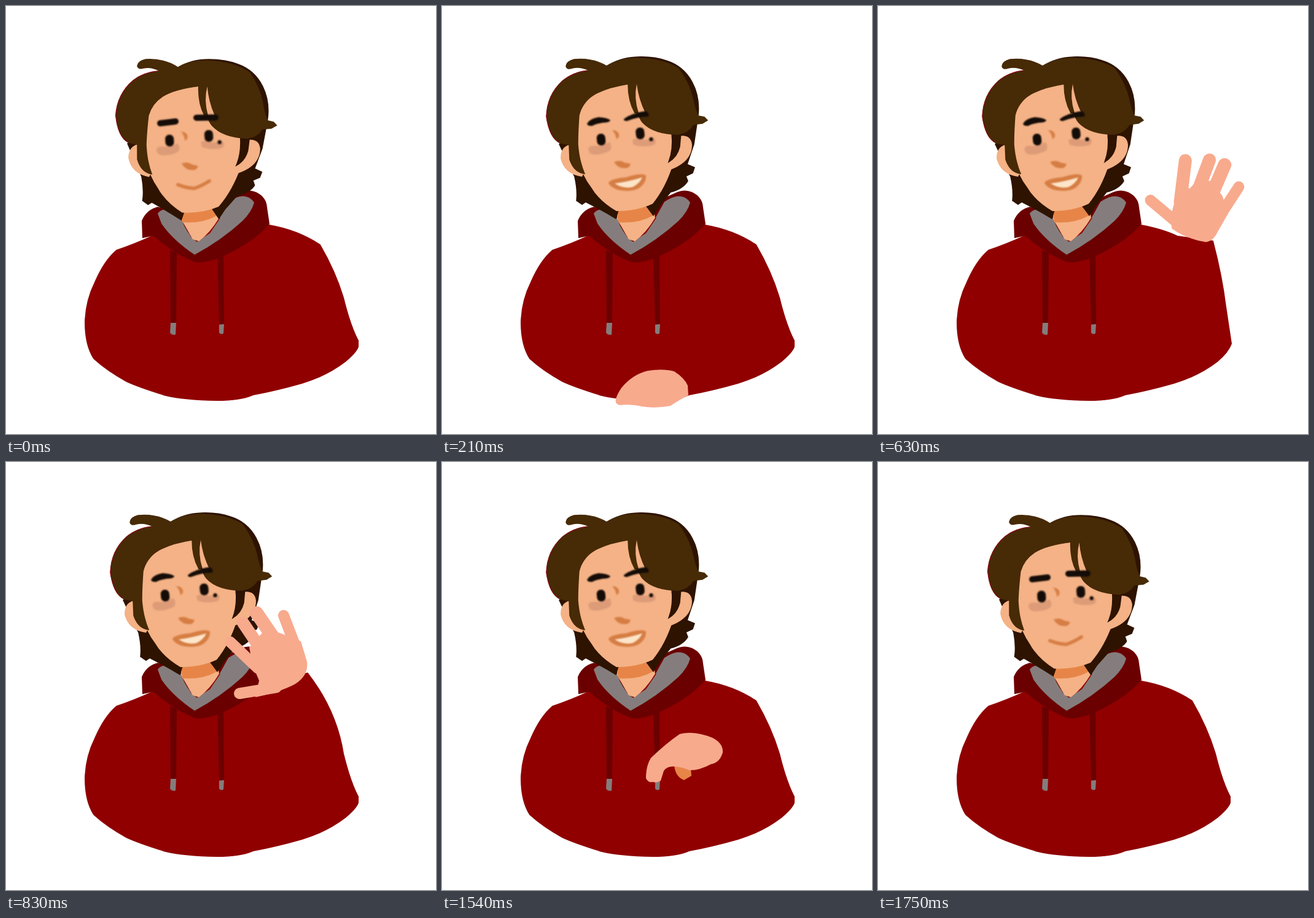
Animation, 700 px wide and 697 px high, one loop 2120 ms. Source, as an HTML page:

```html
<!DOCTYPE html>
<html lang="en">
<head>
<meta charset="utf-8">
<title>Waving</title>
<style>
html, body { margin: 0; width: 100%; height: 100%; overflow: hidden; background: #fff; }
svg { display: block; width: 100%; height: 100%; }
.red { fill: #900000; }
#body { stroke: #900000; stroke-width: 2; }
.hood { fill: #6b0000; }
.grey { fill: #857d7d; }
.skin { fill: #f4b286; }
.hair { fill: #472a06; stroke: #472a06; stroke-width: 1.5; }
.dark { fill: #2e1300; stroke: #2e1300; stroke-width: 1.5; }
.ink { fill: #150c07; }
.blush { fill: #dd9b77; }
.line { fill: #d67d43; }
.shade { fill: #e78548; }
.soft { filter: blur(.8px); }
#hand { fill: #f8aa8d; stroke: #f8aa8d; stroke-width: 0; stroke-linecap: round; }
#calm { fill: none; stroke-linecap: round; stroke-linejoin: round; }
</style>
</head>
<body>
<svg viewBox="0 0 700 697">
  <path id="body"  class="red"/>

  <path class="hood" d="M221 350Q228 332 247 327L300 340L383 303Q395 298 407 303Q424 311 425 328L429 355Q400 388 345 411Q317 421 305 416Q270 402 240 374L222 378Z"/>
  <path class="grey" d="M247 338Q252 331 262 331L285 345L290 358Q300 377 311 384L347 346L362 319Q390 300 404 320Q400 335 385 350Q350 382 307 405Q270 380 253 354Z"/>
  <path class="red" d="M300 375L311 384L332 370L349 345H330Z"/>
  <path class="skin" d="M285 328H344L347 345Q332 370 314 383L304 380L285 347Z"/>
  <path class="shade" d="M284 330L344 324L344 341Q320 355 287 352Z"/>
  <path class="hood" d="M267 398L278 402L277 516H268ZM344 400H354L355 518H347Z"/>
  <path class="grey" d="M268 516H277L276 535Q271 537 267 532ZM347 519L355 518L354 533Q350 536 347 532Z"/>

  <g id="head">
    <path class="dark" d="M268 98Q290 84 318 83Q345 82 365 89C404 101 421 140 417 178L410 225L399 258L411 263L408 272L397 277L400 285Q392 298 372 303L354 325L344 341L330 322L290 322L283 346Q258 331 234 319L228 323L219 317Q221 300 216 278L191 225L300 150Z"/>
    <path class="skin" d="M212 225Q193 227 193 248Q199 274 228 278L236 262ZM380 213Q405 206 407 226Q407 255 368 268Z"/>
    <path class="skin" d="M219 175Q232 135 303 125L335 160L386 205Q388 235 376 258Q364 296 343 322Q318 334 284 334Q256 318 242 294Q227 275 219 240Z"/>
    <path class="dark" d="M374 207Q377 234 369 254Q383 246 387 229L389 206Z"/>
    <path class="hair" d="M202 98Q203 90 215 87Q245 84 268 98Q290 85 318 85Q360 86 385 102Q402 125 408 150Q412 170 417 179L427 181L432 186L424 191L409 193Q402 206 385 209Q345 209 327 190Q320 182 321 175L314 174Q303 155 303 127Q265 133 245 146Q228 158 223 178Q221 205 221 225Q223 252 232 273Q215 271 208 250L207 226L192 223Q175 215 170 180Q171 145 196 122Q215 107 240 105Q225 98 212 101Q203 104 202 98Z"/>
    <path d="M192 223Q175 215 170 180Q171 145 196 122Q212 108 236 105" fill="none" stroke="#9c0018" stroke-width="1"/>
    <path class="skin" d="M317 127Q312 150 320 174L331 174Q320 152 317 127Z"/>
    <g class="soft">
      <path class="blush" d="M238 233Q240 226 253 228L273 222Q279 232 271 237Q252 245 241 240ZM310 219Q318 212 329 218L346 216Q351 223 343 227Q326 231 312 226Z"/>
      <rect class="ink" x="252" y="208" width="14" height="19" rx="6.5" transform="rotate(-6 259 217)"/>
      <rect class="ink" x="315.5" y="198" width="14" height="19" rx="6.5" transform="rotate(-6 322 207)"/>
      <circle class="ink" cx="340.5" cy="217" r="3.2"/>
      <path class="line" d="M277 202Q289 203 288 213L284 217Q283 208 277 202Z"/>
      <path class="line" d="M280 254Q291 250 297 255L307 257Q305 265 297 264Q286 264 280 254Z"/>
    </g>
    <g id="smile" class="soft">
      <path class="ink" d="M236 192Q239 184 255 181Q270 182 274 186Q273 190 262 190Q250 192 245 195Q238 196 236 192ZM296 184Q307 175 331 171Q338 174 336 180Q316 181 302 187Q296 188 296 184Z"/>
      <path class="line" d="M271 288Q275 281 300 279Q325 271 332 276Q333 288 320 297Q305 304 285 299Q273 294 271 288Z"/>
      <path fill="#fde5c9" d="M281 289Q304 286 326 279Q322 289 310 295Q295 298 281 289Z"/>
    </g>
  </g>
  <g id="calm" class="soft">
    <path d="M251 191L276 188M310 182L341 181.5" stroke="#150c07" stroke-width="10"/>
    <path d="M280 291Q292 296 306 297Q317 294 331 285" stroke="#d67d43" stroke-width="5.5"/>
  </g>

  <g id="hand"></g>
</svg>
<script>
const $ = id => document.getElementById(id);

const cuff = "Q560 520 573 545V555";
const arms = {
  rest: "Q475 365 511 389Q536 432 549 475" + cuff,
  up: "L465 368L503 373Q536 425 549 475" + cuff,
  inward: "L440 359L491 344Q538 405 549 475" + cuff,
  half: "Q465 364 487 375L545 383Q560 440 566 490L575 550",
  out: "Q465 364 490 375Q505 377 519 362L580 388Q583 440 581 490L577 550"
};
const torso = arm => "M180 398Q210 388 240 374L428 357" + arm +
  "Q570 564 552 579Q522 602 482 614Q440 626 402 633Q382 642 343 642Q290 641 260 634" +
  "Q215 620 196 611Q165 594 143 574Q129 552 129 515Q130 480 145 450Q160 415 180 398Z";

const shape = (d, extra = "") => `<path d="${d}" ${extra}/>`;
// Each finger: tip x, tip y, base x, base y, thickness.
const open = (palm, fingers) => shape(palm) + fingers.map(([x, y, u, v, w]) =>
  shape(`M${x} ${y}L${u} ${v}`, `style="stroke-width:${w}"`)).join("");

const hands = {
  none: "",
  low: shape("M283 641Q284 634 292 622Q310 600 335 594Q360 590 378 595Q395 606 400 618L401 634Q385 642 372 651Q345 656 325 652Q305 648 290 650Q281 648 283 641Z"),
  bent: shape("M378 494L405 498L406 511L394 518Q380 513 378 494Z", 'class="shade"') +
    shape("M387 443Q410 437 440 449Q458 458 457 473Q452 490 438 492Q420 502 403 502Q370 489 361 503L356 519Q350 523 343 521Q336 523 332 515Q332 495 340 482Q365 458 387 443Z"),
  up: open("M428 303L446 299L452 285L474 277L500 294L518 318L511 352Q509 369 498 374Q465 379 438 370L430 346Z", [
    [425, 258, 438, 325, 21], [462, 245, 459, 315, 21], [488, 245, 482, 310, 22],
    [521, 272, 504, 335, 18], [391, 337, 455, 363, 18]]),
  inward: open("M396 302L420 275L445 278L480 292L490 325Q493 348 470 362Q445 375 406 383L412 356L402 332Z", [
    [365, 293, 410, 336, 18], [386, 262, 415, 305, 20], [408, 246, 438, 290, 22],
    [452, 250, 473, 305, 18], [380, 377, 440, 367, 18]]),
  out: open("M524 328L556 302L590 310L609 330L614 350L586 388Q568 396 545 387L521 370L517 356Z", [
    [563, 256, 538, 325, 18], [601, 268, 565, 320, 21], [623, 280, 590, 335, 19],
    [635, 322, 595, 358, 17], [494, 306, 530, 352, 17]])
};

// start time, smiling, arm, hand, hand transform
const poses = [
  [0, 0, "rest", "none"],
  [130, 1, "rest", "none"],
  [210, 1, "rest", "low"],
  [290, 1, "rest", "bent"],
  [370, 1, "up", "up", "rotate(12 490 375)"],
  [420, 1, "up", "up"],
  [630, 1, "half", "up", "translate(36 8) rotate(18 490 375)"],
  [670, 1, "out", "out"],
  [830, 1, "inward", "inward"],
  [880, 1, "up", "up"],
  [1000, 1, "half", "up", "translate(36 8) rotate(18 490 375)"],
  [1040, 1, "out", "out"],
  [1540, 1, "rest", "bent"],
  [1580, 1, "rest", "low"],
  [1660, 1, "rest", "none"],
  [1750, 0, "rest", "none"]
];
const LOOP = 2120;
let shown;

function draw(time) {
  const t = time % LOOP;
  const pose = poses.findLast(p => p[0] <= t) || poses[0];
  if (pose !== shown) {
    shown = pose;
    const [, smiling, arm, hand, turn = ""] = pose;
    $("body").setAttribute("d", torso(arms[arm]));
    $("hand").innerHTML = hands[hand];
    $("hand").setAttribute("transform", turn);
    $("head").setAttribute("transform", smiling ? "" : "rotate(2.2 300 330) translate(3 3)");
    $("smile").style.display = smiling ? "" : "none";
    $("calm").style.display = smiling ? "none" : "";
  }
}

const start = performance.now();
function tick() {
  draw(performance.now() - start);
  requestAnimationFrame(tick);
}
tick();
</script>
</body>
</html>
```
